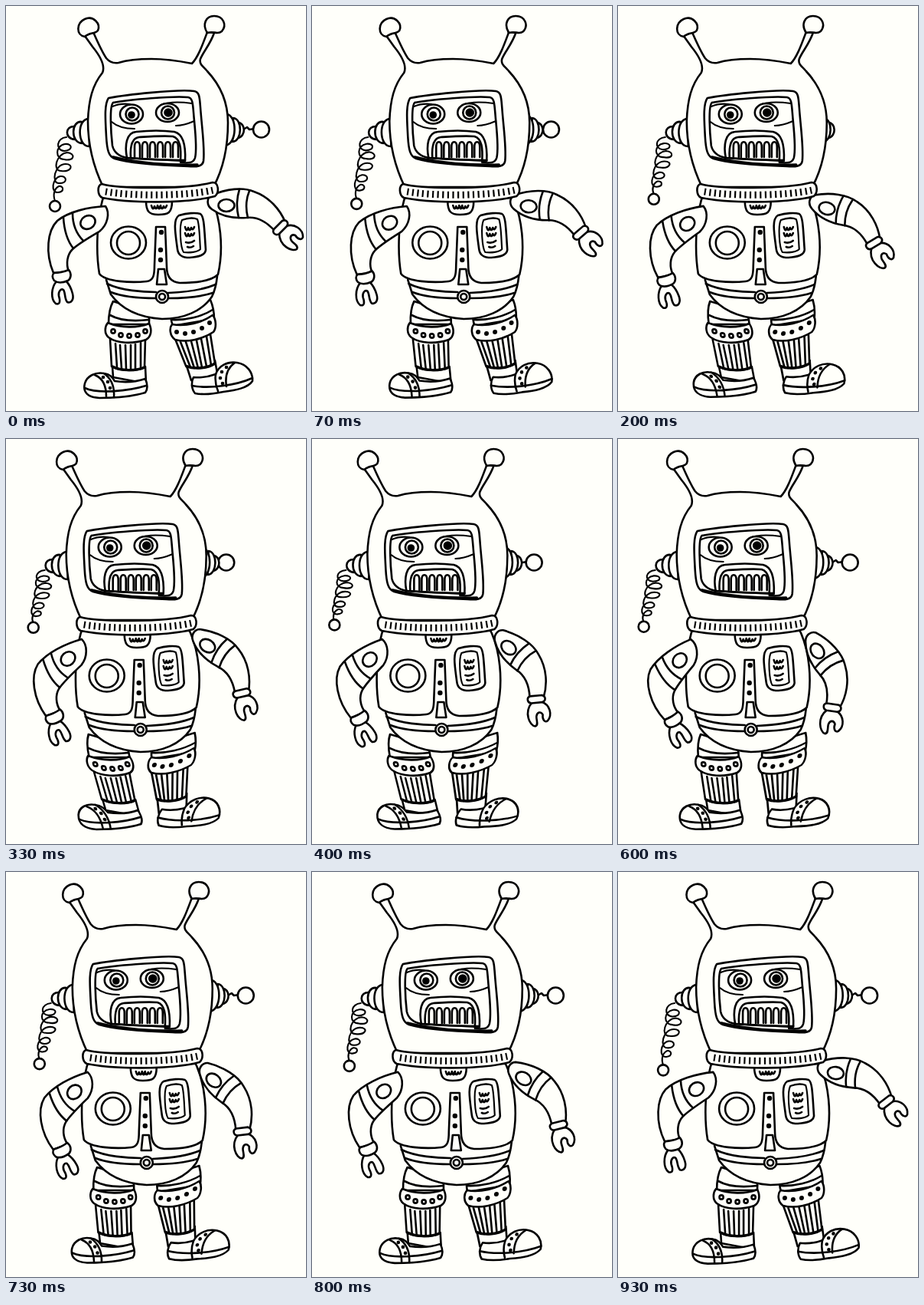
An HTML page without scripts for the animation above (990 ms loop, 392 by 528 pixels).

```html
<!DOCTYPE html>
<html lang="en">
<head>
<meta charset="utf-8">
<title>Dancing robot</title>
<style>
  @property --slide { syntax: "<number>"; inherits: true; initial-value: 0 }
  @property --arm-l { syntax: "<angle>"; inherits: true; initial-value: 0deg }
  @property --arm-r { syntax: "<angle>"; inherits: true; initial-value: 0deg }
  @property --leg-l { syntax: "<angle>"; inherits: true; initial-value: 0deg }
  @property --plug { syntax: "<number>"; inherits: true; initial-value: 0 }

  html, body { margin: 0; width: 100%; height: 100%; overflow: hidden; background: #fffffa }
  svg {
    display: block; width: 392px; height: 528px;
    fill: #fffffa; stroke: #000; stroke-width: 2.6;
    stroke-linecap: round; stroke-linejoin: round;
    animation: dance 990ms -4ms infinite;
  }
  .line { fill: none }
  .ink { fill: #000; stroke: none }
  .fine { fill: none; stroke-width: 2.1 }
  .heavy { fill: none; stroke-width: 3.4 }

  .robot { transform: translateX(calc(var(--slide) * -41px)) }
  .arm-l { transform: rotate(var(--arm-l)); transform-origin: 128px 274px }
  .arm-r { transform: rotate(var(--arm-r)); transform-origin: 273px 271px }
  .leg-l { transform: skewX(var(--leg-l)); transform-origin: 160px 402px }
  .leg-r { transform: skewX(calc(var(--slide) * -17deg)); transform-origin: 245px 421px }
  .foot-r { transform: rotate(calc(var(--slide) * 7deg)); transform-origin: 260px 482px }
  .foot-l { transform: translateY(calc(var(--slide) * -3px)) }
  .rings { transform: translateX(calc(var(--plug) * -11px)) }
  .knob { transform: translateX(calc(var(--plug) * -46px)) }
  .coil { transform: scaleY(calc(1 - var(--slide) * .24)); transform-origin: 78px 171px }
  .coil path { vector-effect: non-scaling-stroke }
  .bob { transform: translateY(calc(var(--slide) * -22px)) }

  /* fifteen poses per loop, stepped evenly between the key poses */
  @keyframes dance {
    0% { --slide: 0; --arm-l: 0deg; --arm-r: 0deg; --leg-l: 0deg; --plug: 0;
      animation-timing-function: steps(3) }
    20.2% { --slide: .42; --arm-l: -5.5deg; --arm-r: 14deg; --leg-l: 8.4deg; --plug: 1;
      animation-timing-function: steps(2) }
    33.67% { --slide: .69; --arm-l: -13deg; --arm-r: 32deg; --leg-l: 12.8deg; --plug: .38;
      animation-timing-function: steps(2) }
    47.14% { --slide: 1; --arm-l: -19.5deg; --arm-r: 47deg; --leg-l: 9.2deg; --plug: 0;
      animation-timing-function: steps(2) }
    60.6% { --slide: .74; --arm-l: -20deg; --arm-r: 53deg; --leg-l: 5.4deg; --plug: 0;
      animation-timing-function: steps(3) }
    80.8% { --slide: .37; --arm-l: -11deg; --arm-r: 31deg; --leg-l: .7deg; --plug: 0;
      animation-timing-function: steps(2) }
    94.28% { --slide: .12; --arm-l: -3deg; --arm-r: 7.6deg; --leg-l: 0deg; --plug: 0;
      animation-timing-function: steps(1) }
    100% { --slide: 0; --arm-l: 0deg; --arm-r: 0deg; --leg-l: 0deg; --plug: 0 }
  }
</style>
</head>
<body>
<svg viewBox="0 0 392 528">
  <defs>
    <path id="tooth" d="M167 197v-13c0-9 7-9 7 0v13"/>
    <path id="scribble" d="M-6-3q2 8 4 1q2 6 4 0q2 5 4-1"/>
  </defs>
  <g class="robot">

    <!-- ears -->
    <g class="knob">
      <path d="M310 161l5-3 3 3 7-1"/>
      <circle cx="333.500" cy="161" r="10.500"/>
    </g>
    <g class="rings">
      <path d="M303 152C313 152 314 170 303 172z"/>
      <path d="M297 146C309 147 309 176 296 177z"/>
      <path d="M288 141C302 142 303 180 286 182z"/>
    </g>
    <g class="coil">
      <path class="fine" d="M79 171C66 172 64 188 76 189C88 188 87 179 77 180C64 182 64 200 76 200C90 203 91 192 80 191C66 192 60 215 72 215C86 217 89 206 78 206C63 206 59 231 69 231C81 232 80 221 71 222C60 224 58 244 68 243C77 242 75 234 69 235C63 238 61 246 64 254"/>
    </g>
    <circle class="bob" cx="64" cy="261" r="7"/>
    <path d="M90 157C77 156 76 173 90 174z"/>
    <path d="M99 151C85 149 84 178 99 179z"/>
    <path d="M109 147C92 146 93 184 109 183z"/>

    <!-- legs -->
    <g class="leg-l">
      <path d="M140 385C135 394 134 404 134 415H187V400z"/>
      <path class="line" d="M136 403C150 411 170 411 187 409"/>
      <path d="M139 470L140 484L183 492L182 470z"/>
      <path d="M136 434L138 470C150 477 172 476 181 471L182 434z"/>
      <path class="line" d="M143 440l2 31M149 442l2 31M156 442l1 32M163 442v32M169 441v32M176 439v32"/>
      <path class="heavy" d="M139 470C150 476 171 476 181 471"/>
      <path d="M133 413C150 420 172 420 187 414C191 422 190 431 183 435C165 441 145 440 134 432C128 427 129 418 133 413z"/>
      <g class="line">
        <circle cx="140" cy="424" r="2.6"/><circle cx="150" cy="429" r="2.6"/>
        <circle cx="161" cy="430" r="2.6"/><circle cx="172" cy="429" r="2.6"/><circle cx="182" cy="424" r="2.6"/>
      </g>
      <g class="foot-l">
        <path d="M103 492C106 482 117 477 128 479C136 480 139 484 142 489C155 491 170 490 182 486C185 493 185 500 182 504C165 509 140 511 122 511C107 510 100 504 103 492z"/>
        <path class="line" d="M103 498C120 506 160 502 183 495M116 481C126 485 131 494 131 509M128 479C138 486 142 496 141 510"/>
        <g class="ink">
          <circle cx="127" cy="484" r="2.3"/><circle cx="133" cy="490" r="2.3"/><circle cx="136" cy="498" r="2.3"/>
        </g>
      </g>
    </g>
    <g class="leg-r">
      <path d="M216 400C215 406 216 412 218 417L272 408C272 400 270 390 267 383z"/>
      <path class="line" d="M216 409C235 410 256 405 270 396"/>
      <path d="M235 466L242 488L277 484L273 462z"/>
      <path d="M221 434L235 469C248 474 264 472 273 466L267 428z"/>
      <path class="line" d="M228 438l13 33M235 438l11 34M242 437l9 35M249 436l7 35M255 434l7 36M262 431l6 37"/>
      <path class="heavy" d="M236 470C248 474 264 472 273 466"/>
      <path d="M217 415C235 418 256 413 270 403C275 409 275 420 271 425C256 435 236 439 221 435C214 430 213 420 217 415z"/>
      <g class="ink">
        <circle cx="223" cy="425" r="3"/><circle cx="234" cy="427" r="3"/>
        <circle cx="245" cy="425" r="3"/><circle cx="256" cy="420" r="3"/><circle cx="266" cy="413" r="3"/>
      </g>
      <g class="foot-r">
        <path d="M245 484C256 485 266 483 274 480C278 469 289 463 302 465C315 467 323 478 322 489C316 498 300 501 284 503C270 506 257 507 247 505C242 499 242 490 245 484z"/>
        <path class="line" d="M243 495C265 499 300 495 322 485M274 480C273 487 274 495 277 502M299 465C289 472 286 483 288 496"/>
        <g class="ink">
          <circle cx="288" cy="471" r="2.3"/><circle cx="282" cy="477" r="2.3"/>
          <circle cx="280" cy="485" r="2.3"/><circle cx="283" cy="492" r="2.3"/>
        </g>
      </g>
    </g>

    <!-- trunk -->
    <path d="M131 357L137 376C150 394 172 406 204 408C232 408 256 398 269 379C273 371 275 362 276 352"/>
    <path d="M127 250C119 275 117 320 122 349C130 360 165 361 184 359C193 358 194 350 194 338L196 288H208L210 340C210 353 215 360 227 361C245 361 268 359 277 350C285 315 280 275 268 250z"/>
    <path class="line" d="M132 362C150 371 180 373 196 373M137 373C152 379 178 381 196 381M212 374C235 373 258 370 274 363M212 381C235 381 255 379 270 374"/>
    <path d="M199 343H207L210 363H197z"/>
    <circle cx="204" cy="379" r="8"/><circle cx="204" cy="379" r="4"/>
    <g class="ink">
      <circle cx="203" cy="295" r="3.2"/><circle cx="202" cy="318" r="3.2"/><circle cx="202" cy="331" r="3.2"/>
    </g>
    <ellipse cx="160" cy="308.500" rx="23" ry="21"/>
    <circle cx="160" cy="309" r="15"/>
    <path d="M226 273C236 270 248 269 254 271C259 274 259 290 261 318C260 325 252 327 240 328C230 328 225 325 224 317C221 295 218 278 226 273z"/>
    <path class="fine" d="M230 279C238 276 246 276 250 278C253 285 253 305 254 317C250 321 240 322 232 321C228 315 226 287 230 279z"/>
    <use href="#scribble" class="line" x="240" y="291"/>
    <use href="#scribble" class="line" x="240" y="299"/>
    <path class="line" d="M235 308q6 2 11-2M237 314q4 2 8-1"/>

    <!-- arms -->
    <g class="arm-l">
      <path d="M66 359C59 367 58 382 65 388C71 390 71 384 69 378C68 372 72 368 75 370C78 374 76 381 80 386C85 388 89 383 87 375C85 367 82 362 78 358z"/>
      <path d="M130 261C108 262 82 268 67 280C54 293 51 322 62 348L82 346C78 336 80 324 87 317C96 309 110 301 122 294C133 285 136 270 130 261z"/>
      <path class="line" d="M87 270C87 284 92 297 101 306M75 276C76 292 80 306 88 316"/>
      <ellipse cx="107" cy="282" rx="10" ry="8.500" transform="rotate(-30 107 282)"/>
      <path d="M63 348C70 348 77 346 82 344C86 349 85 355 81 358C74 361 67 361 63 358C60 354 60 350 63 348z"/>
    </g>
    <g class="arm-r">
      <path d="M366 287C377 283 388 291 388 301C387 306 381 304 378 299C373 297 370 301 373 306C376 310 383 313 380 317C374 321 357 313 357 296z"/>
      <path d="M268 247C288 238 310 236 324 242C344 249 358 265 365 282L351 293C342 283 330 274 314 276C300 277 284 276 269 265C262 260 262 251 268 247z"/>
      <path class="line" d="M305 239C301 252 301 264 304 276M318 241C313 253 313 264 316 276"/>
      <ellipse cx="288" cy="260" rx="10.500" ry="8"/>
      <path d="M361 280C366 278 370 282 367 287L357 297C353 300 347 296 350 291z"/>
    </g>

    <!-- helmet and antennae -->
    <path d="M127 236C112 205 107 175 107 150C108 122 113 103 126 87C130 78 122 64 113 53L103 39L114 34C121 50 127 62 131 68C136 74 141 75 147 74C160 70 175 69 190 69C210 69 228 72 243 75C251 67 257 50 263 34L272 35C267 50 258 59 254 69C252 76 258 79 263 85C278 101 290 122 290 152C290 183 284 212 271 236z"/>
    <path d="M103 40C91 38 92 22 103 17C114 12 124 23 120 32C116 37 109 34 103 40z"/>
    <path d="M263 35C256 24 261 13 272 13C284 13 289 25 282 33C276 38 272 32 263 35z"/>

    <!-- collar -->
    <path d="M183 254C183 268 187 272 199 272C212 272 217 270 217 254z"/>
    <use href="#scribble" class="line" x="196" y="263"/>
    <use href="#scribble" class="line" x="204" y="263"/>
    <path d="M125 232C150 239 235 239 270 230C278 230 279 243 273 248C235 258 160 257 126 250C119 247 119 234 125 232z"/>
    <path class="line" stroke-linecap="butt" stroke-dasharray="2.2 4.4" d="M130 242C165 248 235 248 271 240" style="stroke-width:9"/>

    <!-- face -->
    <path d="M134 120C155 116 225 108 246 111C253 112 253 120 254 132C256 160 260 185 258 202C257 209 250 210 238 209C210 208 165 206 142 199C134 196 132 188 131 170C130 150 128 128 134 120z"/>
    <path class="line" d="M140 126C160 122 220 117 238 119C245 120 244 130 246 150C248 170 249 190 247 198C245 205 238 205 228 204M140 126C135 130 137 165 139 182C141 191 148 196 158 198"/>
    <path class="heavy" d="M140 197C170 205 215 208 250 207"/>
    <path class="fine" d="M139 131C146 128 154 127 162 128M202 129C214 124 228 125 243 127M138 151C146 158 156 160 168 160M222 156C230 156 239 153 246 150"/>
    <ellipse cx="164" cy="141" rx="15" ry="12.500"/>
    <circle cx="165" cy="141" r="8.500"/>
    <circle class="ink" cx="164" cy="142" r="4.800"/>
    <ellipse cx="211" cy="139" rx="15" ry="12"/>
    <circle cx="211.500" cy="139" r="8.500"/>
    <circle class="ink" cx="212" cy="139" r="5.800"/>
    <path d="M158 198C155 182 157 165 170 164C188 162 205 162 220 164C232 167 235 182 234 202z"/>
    <path class="line" d="M163 198C162 183 164 172 174 171C190 170 205 169 218 170C228 173 229 186 228 202"/>
    <g class="line">
      <use href="#tooth" x="1"/><use href="#tooth" x="11"/><use href="#tooth" x="21"/>
      <use href="#tooth" x="31"/><use href="#tooth" x="41"/><use href="#tooth" x="51"/>
    </g>
    <path class="line" d="M159 198C180 200 210 201 234 201"/>
  </g>
</svg>
</body>
</html>
```
